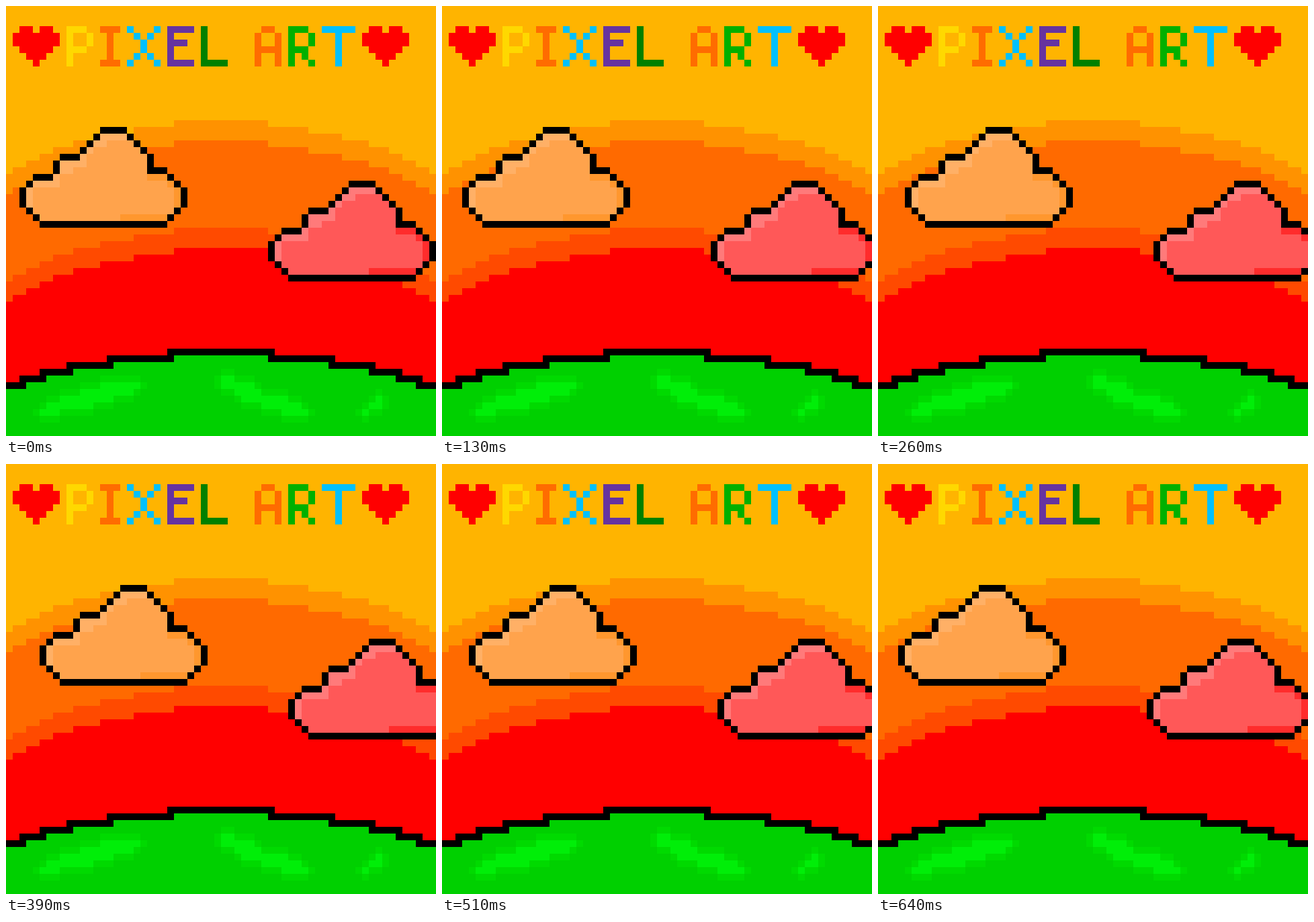
Recreate the animation shown at these times as an HTML page without scripts. Size 640x640 px, loop 770 ms.

```html
<!DOCTYPE html>
<html lang="en">
<head>
<meta charset="utf-8">
<title>Pixel art sunset</title>
<style>
  html, body { margin: 0; height: 100%; overflow: hidden; background: #ffb400; }
  svg { display: block; width: 100vw; height: 100vh; }
  .fill { fill: var(--fill); }
  .light { stroke: var(--light); }
  .shade { stroke: var(--shade); }
  .gold { --fill: #ffa34c; --light: #ffb066; --shade: #ff972e; }
  .coral { --fill: #ff5858; --light: #ff7a7a; --shade: #ff2c2c; }
  .drift { animation: drift 770ms step-end infinite; }
  /* one cell per step: three right, then back */
  @keyframes drift {
    0% { transform: translateX(0); }
    16.883% { transform: translateX(1px); }
    33.766% { transform: translateX(2px); }
    50.649% { transform: translateX(3px); }
    66.234% { transform: translateX(2px); }
    83.117% { transform: translateX(1px); }
    100% { transform: translateX(0); }
  }
</style>
</head>
<body>
<!-- one unit is one pixel-art cell -->
<svg viewBox="0 0 64 64" shape-rendering="crispEdges" fill="none">
  <defs>
    <path id="arc" d="M0 64V8h1v-1h2v-1h2v-1h2v-1h3v-1h4v-1h5v-1h6v-1h14v1h6v1h5v1h4v1h3v1h2v1h2v1h2v1h1V64z"/>
    <path id="heart" d="M1 0h2v1h1v-1h2v1h1v2h-1v1h-1v1h-1v1h-1v-1h-1v-1h-1v-1h-1v-2h1z"/>
    <path id="grass" d="M14 56.5h6M11 57.5h8M8 58.5h8M6 59.5h7M5 60.5h3M32 55.5h2M32 56.5h5M34 57.5h4M35 58.5h7M38 59.5h6M41 60.5h4M55 58.5h1M54 59.5h2M53 60.5h1"/>
    <g id="cloud">
      <path fill="#000" d="M14 18h4v1h1v1h1v1h1v1h1v2h2v1h1v1h1v1h1v3h-1v1h-1v1h-1v1h-19v-1h-1v-1h-1v-1h-1v-3h1v-1h1v-1h3v-2h1v-1h3v-1h1v-1h1v-1h1z"/>
      <path class="fill" d="M14 19h4v1h1v1h1v1h1v3h3v1h1v1h1v3h-1v1h-1v1H5v-1H4v-1H3v-3h1v-1h3v-1h1v-2h3v-1h1v-1h1v-1h1z"/>
      <path class="light" d="M14 19.5h4M13 20.5h2M12 21.5h1M11 22.5h1M8 23.5h4M8 24.5h2M7 25.5h1M4 26.5h4M3 27.5h1M3 28.5h1M3 29.5h1"/>
      <path class="shade" d="M21 25.5h3M24 26.5h1M25 27.5h1M25 28.5h1M25 29.5h1M17 31.5h7"/>
    </g>
  </defs>

  <rect width="64" height="64" fill="#ffb400"/>
  <use href="#arc" y="17" fill="#ff9200"/>
  <use href="#arc" y="20" fill="#ff6a00"/>
  <use href="#arc" y="33" fill="#ff4a00"/>
  <use href="#arc" y="36" fill="#f00"/>

  <g role="img" aria-label="PIXEL ART">
    <use href="#heart" x="1" y="3" fill="#f00"/>
    <g transform="translate(0 3)">
      <path stroke="#ffd800" d="M9.5 0v6M10 .5h2M12.5 1v2M10 3.5h2"/>
      <path stroke="#ff6c00" d="M14 .5h3M15.5 1v4M14 5.5h3"/>
      <path stroke="#00c0ff" d="M18 .5h1m3 0h1M19 1.5h1m1 0h1M20.5 2v2M19 4.5h1m1 0h1M18 5.5h1m3 0h1"/>
      <path stroke="#6633a0" d="M24.5 0v6M25 .5h3M25 2.5h2M25 5.5h3"/>
      <path stroke="#008000" d="M29.5 0v6M30 5.5h3"/>
      <path stroke="#ff6c00" d="M37.5 1v5M38 .5h2M40.5 1v5M38 3.5h2"/>
      <path stroke="#00b000" d="M42.5 0v6M43 .5h2M45.5 1v2M43 3.5h2M44 4.5h1M45 5.5h1"/>
      <path stroke="#00c0ff" d="M47 .5h5M49.5 1v5"/>
    </g>
    <use href="#heart" x="53" y="3" fill="#f00"/>
  </g>

  <path fill="#00d000" d="M0 64V56h2v-1h3v-1h4v-1h6v-1h9v-1h16v1h9v1h6v1h4v1h3v1h2v8z"/>
  <path stroke="#000" d="M0 56.5h3M2 55.5h4M5 54.5h5M9 53.5h7M15 52.5h10M24 51.5h16M39 52.5h10M48 53.5h7M54 54.5h5M58 55.5h4M61 56.5h3"/>
  <g stroke="#00da00">
    <use href="#grass" x="-1"/>
    <use href="#grass" x="1"/>
    <use href="#grass" y="-1"/>
    <use href="#grass" y="1"/>
  </g>
  <use href="#grass" stroke="#00ee08"/>

  <g class="drift">
    <use href="#cloud" class="gold"/>
    <use href="#cloud" class="coral" x="37" y="8"/>
  </g>
</svg>
</body>
</html>
```
